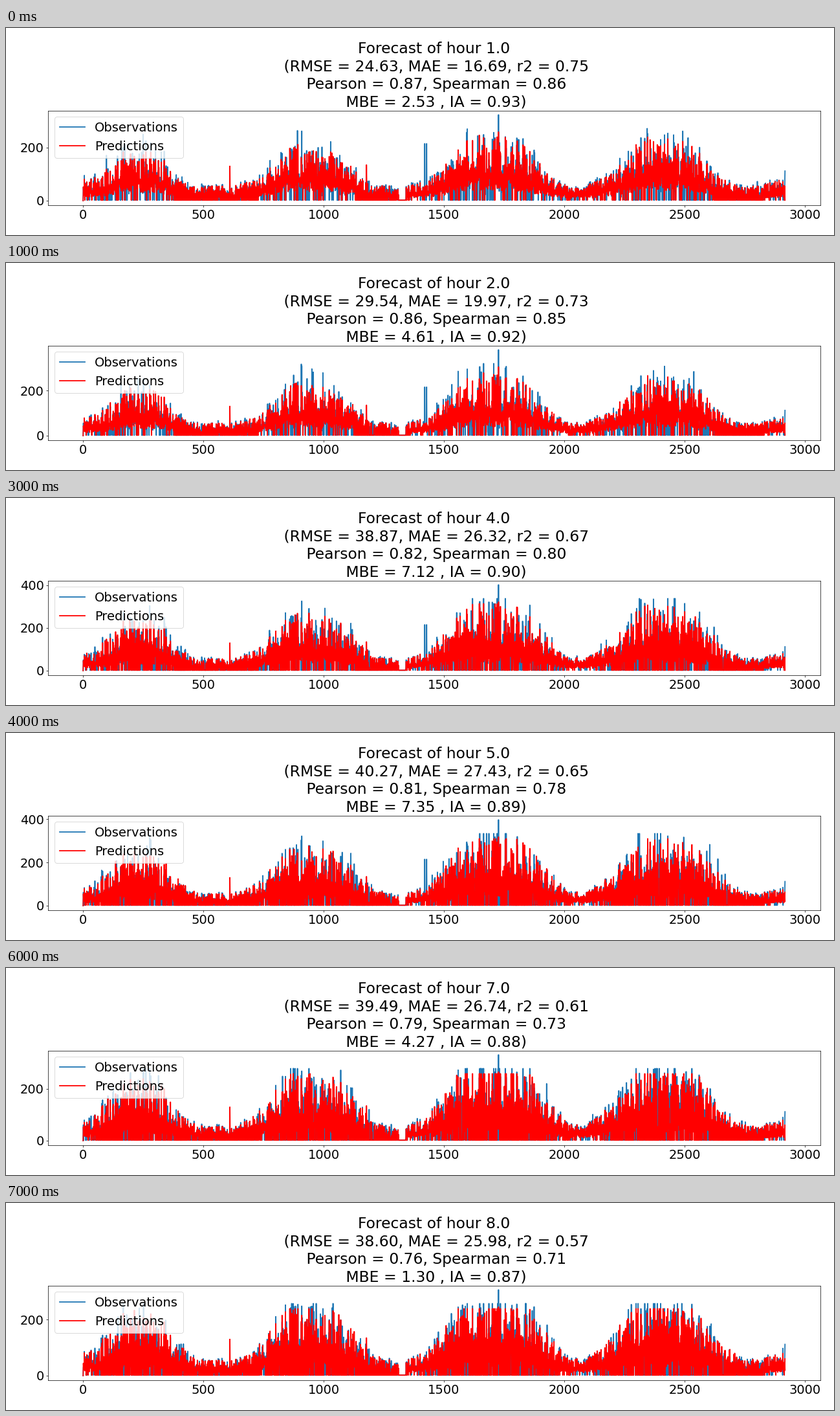
Animation of 1280x320 px, one loop 8000 ms. Source, as a matplotlib script:

```python
import numpy as np
import matplotlib.pyplot as plt
from matplotlib.animation import FuncAnimation

N = 2919
YEAR = 727
LOW = 2.0

plt.rcParams["font.family"] = "DejaVu Sans"
plt.rcParams["font.size"] = 22
plt.rcParams["lines.linewidth"] = 2

# hour: RMSE, MAE, r2, Pearson, Spearman, MBE, IA
STATS = [
    (24.63, 16.69, 0.75, 0.87, 0.86, 2.53, 0.93),
    (29.54, 19.97, 0.73, 0.86, 0.85, 4.61, 0.92),
    (35.26, 23.73, 0.69, 0.84, 0.82, 6.04, 0.91),
    (38.87, 26.32, 0.67, 0.82, 0.80, 7.12, 0.90),
    (40.27, 27.43, 0.65, 0.81, 0.78, 7.35, 0.89),
    (40.21, 27.32, 0.63, 0.80, 0.76, 6.24, 0.89),
    (39.49, 26.74, 0.61, 0.79, 0.73, 4.27, 0.88),
    (38.60, 25.98, 0.57, 0.76, 0.71, 1.30, 0.87),
]
PEAK = [324, 380, 405, 402, 398, 366, 332, 307]

# centre, half width and height of each high season
SEASONS = [(248, 135, 130), (965, 170, 145), (1720, 195, 185), (2430, 190, 175)]
# spells in which values often fall to the floor
CLEAN_SPELLS = [(385, 730), (1130, 1350), (2635, 2830)]

t = np.arange(N)
is_night = t % 2 == 0
base = np.random.default_rng(11)
SHARE, NIGHT, DROP = base.random((3, N))


def envelope(hour, late):
    """Upper limit of the values: a yearly wave plus the high seasons."""
    growth = 1 + 0.45 * np.sin(np.pi * hour / 9)
    cap = 55 + 32 * np.maximum(0, np.cos(2 * np.pi * (t - 80) / YEAR))
    for centre, width, height in SEASONS:
        reach = width * (1 + 0.13 * late)
        cap += height * growth * np.exp(-np.abs((t - centre) / reach) ** 3)
    return cap


def make_series(hour):
    """Observed and predicted values for one forecast hour."""
    rng = np.random.default_rng(100 + hour)
    peak = PEAK[hour]
    late = min(1, hour / 4)
    cap = envelope(hour, late)
    season = np.clip((cap - 70) / 80, 0, 1)

    share = np.clip(SHARE + rng.normal(0, 0.08, N), 0, 1)
    day = cap * (0.38 + 0.62 * share ** (1.2 + 0.7 * season))
    night = cap * (0.16 + 0.26 * NIGHT) * (1 - 0.3 * late * season)

    clean = np.any([(t > a) & (t < b) for a, b in CLEAN_SPELLS], axis=0)
    chance = np.where(clean, 0.5, 0.08) + 0.27 * late ** 2 * season
    limit = chance * np.where(is_night, 1.5, 0.35)
    drop = (DROP + rng.normal(0, 0.06, N)) % 1

    pred = np.where(is_night, night, day)
    obs = pred * (1.04 + rng.normal(0, 0.08 + 0.1 * season, N))
    pred = np.where(drop < limit, LOW, pred)
    obs = np.where(rng.random(N) < limit + 0.1 * season, LOW, obs)

    pred = np.clip(pred, LOW, 0.78 * peak)
    obs = np.clip(obs, LOW, 0.84 * peak)
    obs[909], obs[1727], obs[2918] = 0.81 * peak, peak, 112
    pred[610], pred[1178], pred[1727] = 130, 135, 0.8 * peak
    if hour < 5:
        obs[1420] = obs[1428] = 215
    for series in (obs, pred):
        series[1312:1342] = LOW
        series[0] = 0
    return obs, pred


def title(hour):
    rmse, mae, r2, pearson, spearman, mbe, ia = STATS[hour]
    return (f"Forecast of hour {hour + 1:.1f}\n"
            f" (RMSE = {rmse:.2f}, MAE = {mae:.2f}, r2 = {r2:.2f}\n"
            f" Pearson = {pearson:.2f}, Spearman = {spearman:.2f}\n"
            f" MBE = {mbe:.2f} , IA = {ia:.2f})")


SERIES = [make_series(hour) for hour in range(len(STATS))]

fig, ax = plt.subplots(figsize=(20, 5), dpi=64)
fig.subplots_adjust(left=65 / 1280, right=1258.5 / 1280,
                    bottom=1 - 273.6 / 320, top=1 - 127.5 / 320)
obs_line, = ax.plot(t, SERIES[0][0], color="tab:blue", label="Observations")
pred_line, = ax.plot(t, SERIES[0][1], color="red", label="Predictions")
ax.legend(loc="upper left")


def draw(hour):
    obs, pred = SERIES[hour]
    obs_line.set_ydata(obs)
    pred_line.set_ydata(pred)
    ax.set_ylim(-0.05 * PEAK[hour], 1.05 * PEAK[hour])
    ax.set_title(title(hour), linespacing=1.26)
    return obs_line, pred_line


anim = FuncAnimation(fig, draw, frames=len(STATS), interval=1000,
                     repeat=True, repeat_delay=0, blit=False)
plt.show()
```
